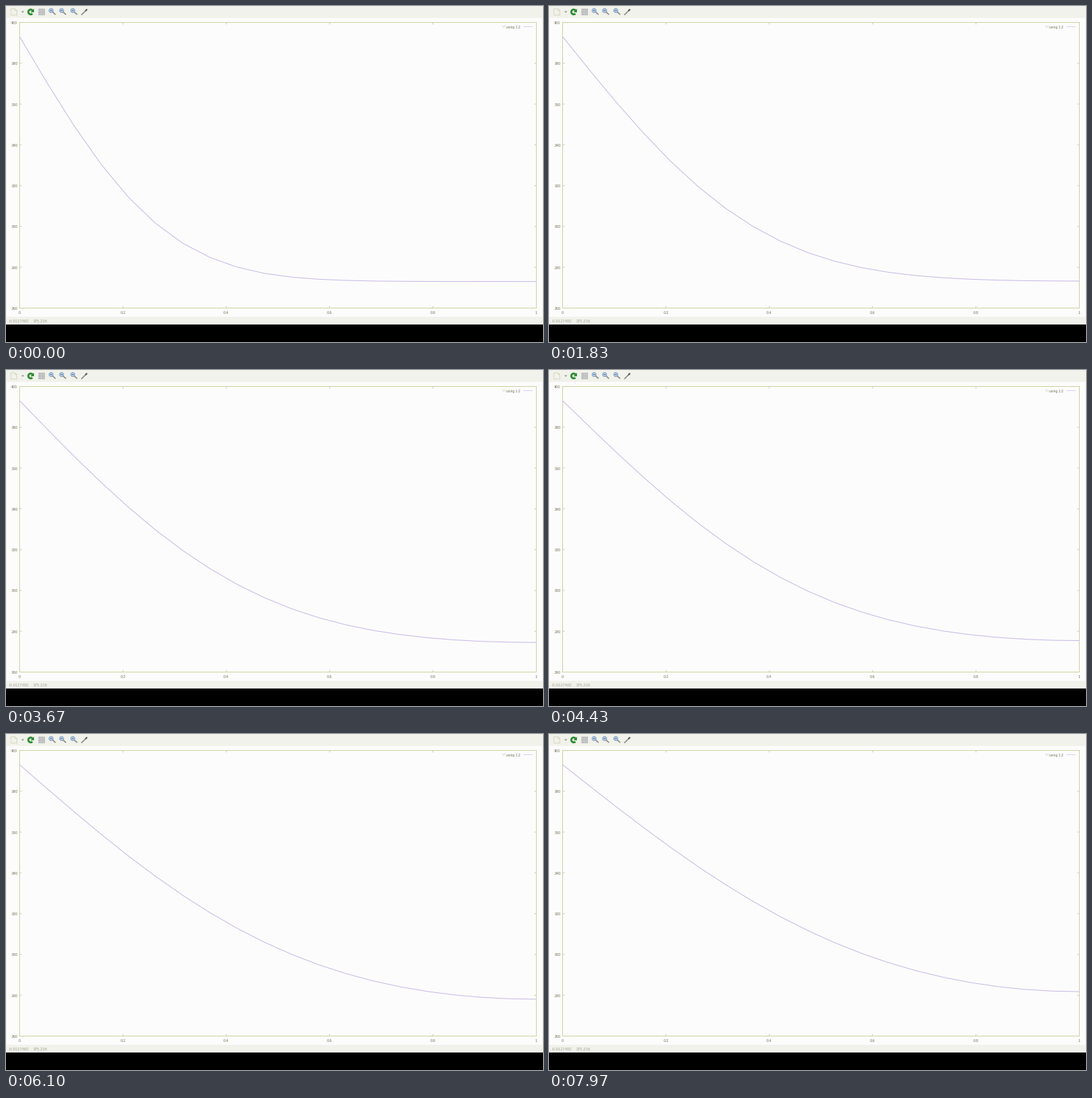
Animation, 768 px wide and 480 px high, one loop 8000 ms. Source, as a matplotlib script:

```python
import math

import matplotlib.pyplot as plt
import numpy as np
from matplotlib.animation import FuncAnimation
from matplotlib.patches import Arc, Circle, Polygon, Rectangle

W, H, DPI = 768, 480, 100
FRAMES, STEP_MS = 250, 32
PX = 72 / DPI  # one pixel in points

PAPER, CHROME, AXIS = "#fcfcfc", "#f1f2eb", "#cfd1a2"
INK, CURVE, STATUS = "#74745c", "#c8b9e6", "#a6a694"
LEFT, RIGHT, TOP, BOTTOM = 19.5, 758.5, 23.5, 431.5
HOT, COLD = 393, 273

fig = plt.figure(figsize=(W / DPI, H / DPI), dpi=DPI, facecolor="black")
ax = fig.add_axes([0, 0, 1, 1])
ax.set_xlim(0, W)
ax.set_ylim(H, 0)
ax.axis("off")


def to_x(u):
    return LEFT + (RIGHT - LEFT) * u


def to_y(temp):
    return BOTTOM - (BOTTOM - TOP) * (temp - 260) / 140


def box(x, y, w, h, color):
    ax.add_patch(Rectangle((x, y), w, h, fc=color, lw=0))


def line(xs, ys, color, width=1.0):
    return ax.plot(xs, ys, color=color, lw=width * PX, snap=False,
                   solid_capstyle="butt")[0]


def label(x, y, text, size=5.5, color=INK, ha="center"):
    ax.text(x, y, text, fontsize=size * PX, color=color, ha=ha,
            va="center_baseline", family="Liberation Sans")


def page_icon(x, y):
    edge = "#d6d6bc"
    line([x - 4.5, x + 1.5, x + 4, x + 4, x - 4.5, x - 4.5],
         [y - 4.5, y - 4.5, y - 2, y + 4.5, y + 4.5, y - 4.5], edge, 0.9)
    line([x + 1.5, x + 1.5, x + 4], [y - 4.5, y - 2, y - 2], edge, 0.9)
    ax.add_patch(Polygon([(x + 10.5, y - 1), (x + 14.5, y - 1),
                          (x + 12.5, y + 1.3)], fc="#8f8f82", lw=0))


def refresh_icon(x, y):
    green = "#2e8b34"
    ax.add_patch(Arc((x - 0.2, y), 6.8, 6.8, theta1=45, theta2=325,
                     ec=green, lw=2.8 * PX))
    ax.add_patch(Polygon([(x - 0.2, y + 0.2), (x + 4.8, y + 0.2),
                          (x + 4.8, y - 4.8)], fc=green, lw=0))


def grid_icon(x, y):
    for d in (-3.6, -1.2, 1.2, 3.6):
        line([x - 4.8, x + 4.8], [y + d, y + d], "#a3a7ab", 0.9)
        line([x + d, x + d], [y - 4.8, y + 4.8], "#a3a7ab", 0.9)


def lens_icon(x, y):
    line([x + 0.5, x + 4.8], [y + 0.5, y + 4.3], "#8a8a88", 1.6)
    ax.add_patch(Circle((x - 1.5, y - 1.5), 2.9, fc="#b4cbe4",
                        ec="#8aa3c0", lw=PX))
    line([x - 3, x], [y - 1.5, y - 1.5], "#5580b4", 1.0)


def wrench_icon(x, y):
    line([x - 4.3, x + 2.5], [y + 4.3, y - 2.3], "#8a8a80", 1.6)
    line([x + 1.5, x + 4], [y - 1.5, y - 3.8], "#5c5c58", 2.2)


def draw_window():
    box(0, 0, W, 455, CHROME)
    box(1, 17, W - 2, 427, PAPER)
    page_icon(11.5, 8.5)
    refresh_icon(35.5, 8.5)
    grid_icon(51, 8.5)
    for x in (66, 81, 97):
        lens_icon(x, 8)
    wrench_icon(112, 8.5)
    label(3.5, 450, "-0.0127482", 5.8, STATUS, "left")
    label(39, 450, "375.216", 5.8, STATUS, "left")


def draw_axes():
    ax.add_patch(Rectangle((LEFT, TOP), RIGHT - LEFT, BOTTOM - TOP,
                           fc="none", ec=AXIS, lw=PX, snap=False))
    for temp in range(260, 401, 20):
        y = to_y(temp)
        line([LEFT, LEFT + 3], [y, y], AXIS)
        line([RIGHT - 3, RIGHT], [y, y], AXIS)
        label(16.8, y + 0.5, str(temp), ha="right")
    for i in range(6):
        x = to_x(i / 5)
        line([x, x], [BOTTOM - 3, BOTTOM], AXIS)
        line([x, x], [TOP, TOP + 3], AXIS)
        label(x, 438.2, f"{i / 5:g}")
    label(735.5, 30, "'-' using 1:2", 5, ha="right")
    line([740, 753], [29.5, 29.5], "#dccfee")


draw_window()
draw_axes()

# Rod heated at the left end, insulated at the right end
nodes = np.linspace(0, 1, 20)
curve = line(to_x(nodes), np.full(nodes.size, to_y(COLD)), CURVE)
erfc = np.vectorize(math.erfc)


def temperature(ms):
    spread = 0.0248 + 1.18e-5 * ms - 7e-11 * ms ** 2
    scale = 2 * math.sqrt(spread)
    heat = erfc(nodes / scale) + erfc((2 - nodes) / scale)
    return COLD + (HOT - COLD) * heat


def update(frame):
    curve.set_ydata(to_y(temperature(frame * STEP_MS)))
    return (curve,)


anim = FuncAnimation(fig, update, frames=FRAMES, interval=STEP_MS,
                     repeat=True, repeat_delay=0, blit=False)
plt.show()
```
